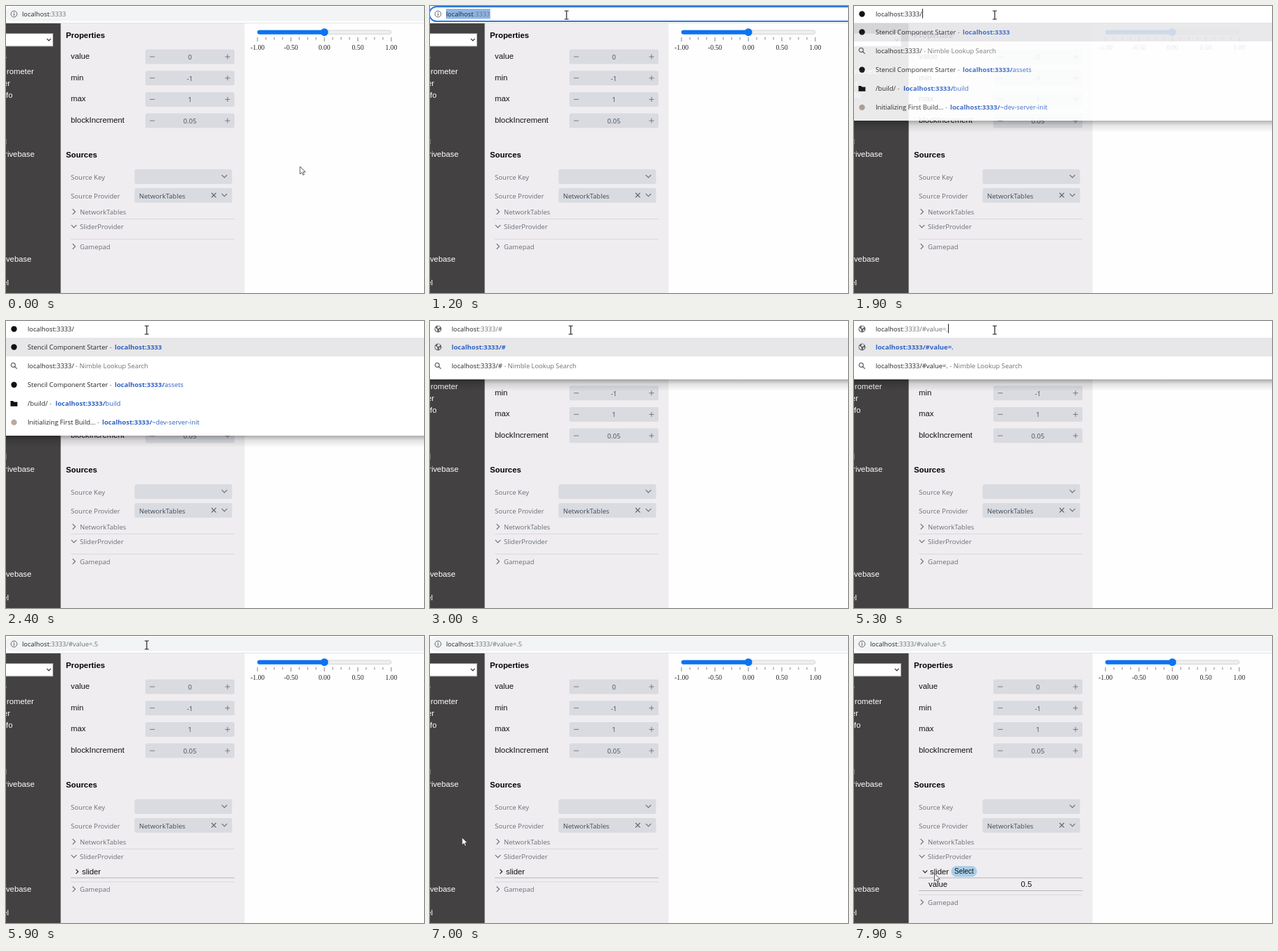
Animation, 600 px wide and 413 px high, one loop 8 s. Source, as an HTML page:

```html
<!DOCTYPE html>
<html lang="en">
<head>
<meta charset="utf-8">
<title>Slider address demo</title>
<style>
html, body { margin: 0; width: 100%; height: 100%; overflow: hidden; background: #fff; }
svg { display: block; width: 600px; height: 413px; }
text { white-space: pre; }
.ui { font-family: "Open Sans", "Noto Sans", sans-serif; font-size: 9.4px; fill: #222529; }
.label { font-size: 9.6px; font-weight: 500; fill: #6b7079; }
.field { font-size: 9.6px; font-weight: 500; fill: #414b59; }
.arial { font-family: "Liberation Sans", Arial, sans-serif; font-size: 11.35px; fill: #111; }
.head { font-weight: bold; fill: #000; }
.nav { fill: #fff; text-anchor: end; }
.mid { text-anchor: middle; }
.tick { font-family: "Liberation Serif", serif; font-size: 9.7px; fill: #222; text-anchor: middle; }
.grey { fill: #6b6f74; }
.blue { fill: #2f62c4; }
.bold { font-weight: 700; font-size: 9.5px; }
</style>
</head>
<body>
<svg id="stage" viewBox="0 0 600 413" xmlns="http://www.w3.org/2000/svg"></svg>
<script>
const LOOP = 8000;
const stage = document.getElementById("stage");
const clamp = v => Math.max(0, Math.min(1, v));

const text = (x, y, s, cls, extra = "") => `<text x="${x}" y="${y}" class="${cls}" ${extra}>${s}</text>`;
const rect = (x, y, w, h, fill, extra = "") =>
  `<rect x="${x}" y="${y}" width="${w}" height="${h}" fill="${fill}" ${extra}/>`;
const path = (d, color, width = 1, extra = "") =>
  `<path d="${d}" fill="none" stroke="${color}" stroke-width="${width}" ${extra}/>`;
const down = (x, y, r = 3.8, color = "#6c7077") =>
  path(`M${x - r} ${y - r / 2}l${r} ${r}l${r} ${-r}`, color, 1.2);
const right = (x, y, r = 3.8, color = "#6c7077") =>
  path(`M${x - r / 2} ${y - r}l${r} ${r}l${-r} ${r}`, color, 1.2);
const rule = (y, color = "#d9d8dc") => path(`M93 ${y}H328`, color);

function navBar() {
  const items = [["Settings", 1, 76], ["Accelerometer", 40, 98], ["Controller", 6, 115],
    ["Info", 9.5, 132], ["Panel", 1, 199], ["Drivebase", 41, 216.5],
    ["Drivebase", 36.5, 368], ["Wheel", 4, 402]];
  return rect(0, 25, 78.5, 388, "#434142") +
    rect(-5, 39.5, 72.5, 18.5, "#fff", 'stroke="#85858a"') +
    down(61.5, 48.5, 2.8, "#222") +
    items.map(([s, x, y]) => text(x, y, s, "arial nav")).join("");
}

function numberField(name, value, i) {
  const y = 62.5 + i * 30.7, c = y + 10.5;
  return text(93, c + 2.8, name, "arial") +
    rect(200, y, 128, 21, "#d9dbe0", 'rx="2.5"') +
    path(`M206.5 ${c}h7M314.5 ${c}h7M318 ${c - 3.5}v7`, "#747980", 1) +
    text(264, c + 4, value, "ui field mid");
}

function sourceFields() {
  return [["Source Key", 235], ["Source Provider", 262]].map(([s, y]) =>
    text(93, y + 14.5, s, "ui label") +
    rect(184.5, y, 140, 21, "#d9dbe0", 'rx="2.5"') + down(313.5, y + 10)).join("") +
    text(191, 276.5, "NetworkTables", "ui field") +
    path("M295 269l6.5 6.5M301.5 269l-6.5 6.5", "#5f646c", 1.1);
}

function slider() {
  let s = rect(361, 35, 192, 5.5, "#efefef", 'rx="2.7" stroke="#c8c8c8" stroke-width=".7"') +
    rect(360.7, 34.8, 96, 6, "#0a74f5", 'rx="3"') +
    '<circle cx="457" cy="37.7" r="5.5" fill="#0a74f5"/>';
  for (let i = 0; i <= 16; i++) {
    const x = 361 + i * 12, major = i % 4 === 0;
    s += path(`M${x} 45v${major ? 6 : 3.5}`, "#777", 0.9);
    if (major) s += text(x, 63, ((i - 8) / 8).toFixed(2), "tick");
  }
  return s;
}

function tree() {
  return right(97.5, 296) + text(106, 300, "NetworkTables", "ui label") + rule(306.5) +
    down(97.5, 317) + text(106, 320.5, "SliderProvider", "ui label") +
    '<g id="entry">' +
      `<g id="closed">${right(102, 339, 3.2, "#222")}</g>` +
      `<g id="open">${down(102, 339, 3.2, "#222")}</g>` +
      text(109, 342.5, "slider", "arial") + rule(348, "#b5b5b9") +
      `<g id="pick">${rect(139.5, 331, 37, 15.5, "#a9cde9", 'rx="7.7"')}` +
      `${text(158, 342, "Select", "arial mid", 'style="font-size:10px"')}</g>` +
      `<g id="detail">${text(107, 360.5, "value", "arial")}${text(239.5, 360.5, "0.5", "arial")}` +
      `${rule(366.5, "#b5b5b9")}</g></g>` +
    `<g id="tail">${rule(335.5)}${right(97.5, 346)}${text(106, 350, "Gamepad", "ui label")}</g>`;
}

const icons = {
  info: '<circle cx="11.5" cy="11.5" r="4.4" fill="none" stroke="#5f6368"/>' +
    path("M11.5 10.8v3.2M11.5 8.7v1.2", "#5f6368", 1.1),
  mark: '<circle cx="11.5" cy="11.5" r="4.2" fill="#111"/>',
  pale: '<circle cx="11.5" cy="11.5" r="4.2" fill="#b9aa9d"/>',
  globe: '<circle cx="11.5" cy="11.5" r="5" fill="#5f6368"/>' +
    '<path d="M7.5 9.5l3 2.7v3q-3.5-1.5-3-5.7M11 7.2l3.5.8-1.2 2.4-2.8.4M13 12l2.3.5-1.8 2.8z" fill="#fff"/>',
  search: '<circle cx="10.3" cy="10.3" r="3" fill="none" stroke="#5f6368" stroke-width="1.2"/>' +
    path("M12.5 12.5l3.2 3.2", "#5f6368", 1.3),
  folder: '<path d="M6.5 7.7h3.7l1.2 1.4h5v6.4h-9.9z" fill="#111"/>'
};

stage.innerHTML =
  '<defs><linearGradient id="shade" x2="0" y2="1"><stop stop-color="#000" stop-opacity=".32"/>' +
  '<stop offset=".4" stop-color="#000" stop-opacity=".11"/><stop offset="1" stop-color="#000" stop-opacity="0"/>' +
  '</linearGradient></defs>' +
  rect(0, 0, 600, 413, "#fefefe") + rect(78.5, 25, 264, 388, "#efedf0") + navBar() +
  text(86, 46, "Properties", "arial head") +
  [["value", "0"], ["min", "-1"], ["max", "1"], ["blockIncrement", "0.05"]]
    .map(([n, v], i) => numberField(n, v, i)).join("") +
  text(86, 217.5, "Sources", "arial head") + sourceFields() + tree() + slider() +
  rect(0, 0, 600, 25, "#fff") + path("M0 24.5H600", "#e2e2e4") +
  '<rect id="bar" x="-1" y="1" width="640" height="21" rx="10.5"/>' +
  '<g id="popup"></g><g id="top"></g>' +
  rect(23, 4, 63.5, 14.5, "#8fb6e8", 'id="mark"') +
  '<g id="icon"></g>' +
  '<text id="address" class="ui" y="14.7"><tspan id="host">localhost</tspan><tspan id="rest"></tspan></text>' +
  rect(0, 4, 1, 13.5, "#222", 'id="caret"') +
  '<path id="arrow" d="M0 0V10.8L2.6 8.5L4.3 12.2L6.1 11.4L4.4 7.8H7.9Z" fill="#fff" stroke="#333" stroke-width=".8"/>' +
  path("M-3 -6H-1Q0 -6 0 -5V5Q0 6 -1 6H-3M3 -6H1Q0 -6 0 -5V5Q0 6 1 6H3", "#222", 1.2, 'id="beam"');

const el = {};
stage.querySelectorAll("[id]").forEach(n => el[n.id] = n);
const show = (name, on) => el[name].setAttribute("visibility", on ? "visible" : "hidden");
const move = (name, x, y) => el[name].setAttribute("transform", `translate(${x} ${y})`);

// [time, text after the host, time at which the caret blinks off]
const typing = [[0, ":3333"], [1500, ":3333", 2000], [1700, ":3333/", 2200], [2500, ":3333/#", 3000],
  [3400, ":3333/#v"], [3600, ":3333/#va"], [3700, ":3333/#val"], [3900, ":3333/#valu"],
  [4100, ":3333/#value"], [4300, ":3333/#value=", 4900], [5300, ":3333/#value=."],
  [5500, ":3333/#value=.5"]];

const route = [[0, 422, 231], [200, 422, 231], [300, 315, 155], [400, 145, 45], [500, 82, 13],
  [700, 82, 13], [1200, 196, 13], [1500, 202, 13], [6400, 202, 13], [6700, 165, 110],
  [7000, 46, 290], [7200, 92, 335], [7300, 98, 339], [7600, 101, 346], [7800, 101, 346],
  [7900, 115.5, 342], [8000, 115.5, 342]];

function pointer(t) {
  const i = Math.max(1, route.findIndex(k => k[0] >= t));
  const [t0, x0, y0] = route[i - 1], [t1, x1, y1] = route[i];
  const p = clamp((t - t0) / (t1 - t0));
  return [x0 + (x1 - x0) * p, y0 + (y1 - y0) * p];
}

const span = (s, cls, x) => `<tspan class="${cls}"${x ? ` x="${x}"` : ""}>${s}</tspan>`;
const link = (strong, plain = "", x) => span(strong, "blue bold", x) + span(plain, "blue");
const dash = span(" - ", "grey");

function rows(rest) {
  const url = "localhost" + rest, starter = "Stencil Component Starter" + dash;
  const find = ["search", url + span(" - Nimble Lookup Search", "grey")];
  if (rest === ":3333/") return [
    ["mark", starter + link("localhost:3333", "", 156)],
    find,
    ["mark", starter + link(url, "assets", 156)],
    ["folder", "/build/" + dash + link(url, "build", 71)],
    ["pale", "Initializing First Build..." + dash + link(url, "~dev-server-init", 138)]
  ];
  const list = [["globe", link(url)], find];
  const known = ":3333/#value=3";
  if (rest.length > 7 && known.startsWith(rest))
    list.push(["mark", starter + link(url, known.slice(rest.length), 156)]);
  return list;
}

let drawn = "";
function popup(rest) {
  if (rest === drawn) return;
  drawn = rest;
  const list = rows(rest), bottom = 30 + list.length * 27;
  el.popup.innerHTML = rect(0, bottom, 600, 17, "url(#shade)") +
    rect(0, 24, 600, bottom - 24, "#fff") + rect(0, 24, 600, 27, "#e7e7e9") +
    list.map(([icon, s], i) => `<g transform="translate(0 ${26 + i * 27.1})">${icons[icon]}</g>` +
      text(31, 41 + i * 27.1, s, "ui")).join("");
}

function draw(ms) {
  const t = Math.floor(ms / 100) * 100;
  const [, rest, off] = typing.filter(k => k[0] <= t).pop();
  const listing = t >= 1700 && t < 5800;
  const focused = t >= 700 && t < 1700;

  el.bar.setAttribute("fill", focused || listing ? "#fff" : "#f3f4f5");
  el.bar.setAttribute("stroke", focused ? "#2f78d8" : "none");
  el.bar.setAttribute("stroke-width", 2);
  show("mark", t >= 700 && t < 1500);

  show("popup", listing);
  if (listing) {
    popup(rest);
    el.popup.setAttribute("opacity", Math.min(1, 0.3 + (t - 1700) / 340));
  }
  el.icon.innerHTML = icons[!listing ? "info" : rest === ":3333/" ? "mark" : "globe"];

  const x = listing ? 31 : 23;
  el.address.setAttribute("x", x);
  el.rest.textContent = rest;
  el.rest.setAttribute("class", rest === ":3333/" ? "" : "grey");
  show("caret", t >= 1500 && t < 5800 && !(off && t >= off));
  el.caret.setAttribute("x", Math.round(x + el.address.getComputedTextLength()));

  const entry = t >= 5800, grow = clamp((t - 7300) / 300);
  el.entry.style.display = entry ? "" : "none";
  show("closed", entry && t < 7400);
  show("open", t >= 7400);
  show("pick", t >= 7200);
  el.detail.setAttribute("opacity", grow);
  move("tail", 0, entry ? 18.3 + 18.8 * grow : 0);

  const [px, py] = pointer(t), inBar = py < 23;
  show("beam", inBar);
  show("arrow", !inBar);
  move(inBar ? "beam" : "arrow", px, py);
}

const start = performance.now();
function tick() {
  draw((performance.now() - start) % LOOP);
  requestAnimationFrame(tick);
}
tick();
</script>
</body>
</html>
```
